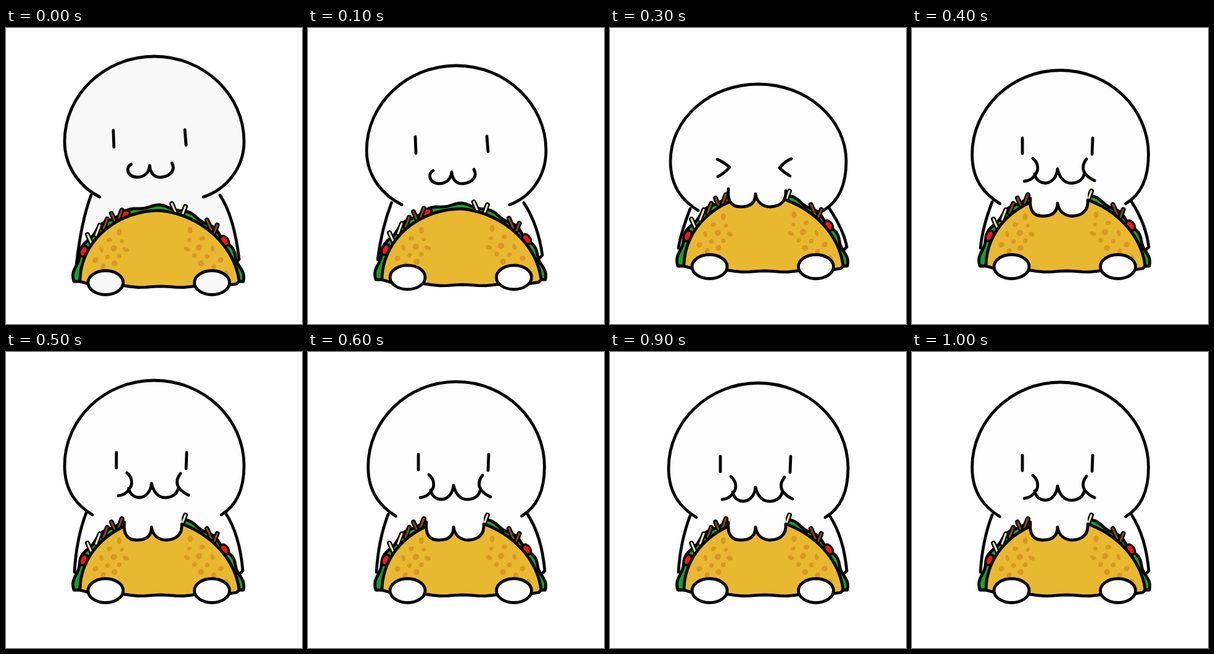
These frames come from a looping animation (480 by 480 pixels, 1.1 s). An HTML page with a canvas:

```html
<!DOCTYPE html>
<html>
<head>
<meta charset="utf-8">
<style>
html, body { margin: 0; width: 100%; height: 100%; overflow: hidden; background: #fff; }
canvas { display: block; width: 480px; height: 480px; }
</style>
</head>
<body>
<canvas id="stage" width="480" height="480"></canvas>
<script>
const ctx = document.getElementById('stage').getContext('2d');
const STEP = 100, STEPS = 11, BITE = 3, CHEW = 5;
const BROWN = '#8a4b12', CREAM = '#f6eab4', RED = '#f3151c', GREEN = '#18a030';
const { PI, sin, cos, min, max } = Math;

const SMILE = 'M203 221C195 224 194 240 212 242C225 242 232 234 233 223C234 236 241 243 252 242C268 240 275 229 269 219';
const JAW = 'M208 241Q207 248 211 256M266 240Q268 246 269 252';
const CHEWING = 'M196 196C205 203 206 215 200 222Q194 232 182 233M199 221C201 231 208 236 217 236C228 235 235 225 236 213' +
  'C239 227 247 237 260 236C270 235 277 230 279 222M283 197C276 206 276 214 281 221Q287 228 296 232';
const SQUINT = 'M174 213Q184 217 194 226Q186 235 175 241M294 212Q282 217 275 227Q283 235 292 240';
const BITTEN = 'M192 276C190 296 197 305 212 305C228 305 236 298 236 284C238 298 248 305 260 305C277 304 286 296 285 279';

function ink(path, width = 4.8, color = '#000') {
  ctx.lineWidth = width;
  ctx.strokeStyle = color;
  ctx.stroke(new Path2D(path));
}

function paint(path, color, width) {
  ctx.fillStyle = color;
  ctx.fill(new Path2D(path));
  if (width) ink(path, width);
}

function oval(x, y, rx, ry, turn = 0) {
  const path = new Path2D();
  path.ellipse(x, y, rx, ry, turn, 0, PI * 2);
  return path;
}

function shifted(dy, draw) {
  ctx.save();
  ctx.translate(0, dy);
  draw();
  ctx.restore();
}

// A point on the taco: r = 1 is the shell's edge, which is flatter on the right.
function onTaco(angle, r) {
  const size = r - 0.05 * max(0, sin(2 * angle));
  return [249 + 129 * size * cos(angle), 411 - 115 * size * sin(angle)];
}

function dome(radius) {
  const points = [];
  for (let i = 0; i <= 80; i++) {
    const angle = PI * (1 - i / 80);
    points.push(onTaco(angle, radius(angle)));
  }
  return points;
}

const polygon = points => `M${points.join('L')}Z`;

const shellRim = dome(() => 1);
for (let u = 0; u <= 1; u += 0.05) {
  shellRim.push([374 - 246 * u, 415 + 5 * sin(PI * u) + 1.2 * sin(22 * u)]);
}
const shell = polygon(shellRim);
const lettuce = polygon(dome(a => 1.065 - 0.012 * cos(a) + 0.017 * sin(17 * a)));

const degrees = d => d * PI / 180;
const tomatoes = [35, 115, 156].map(degrees);
const sticks = [[BROWN, [46, 52, 118, 123, 130]], [CREAM, [73, 80, 137, 146]]];

function drawSticks(color, angles) {
  angles.forEach((angle, i) => {
    const [x, y] = onTaco(degrees(angle), 1.06);
    const lean = i % 2 ? 3.5 : -3;
    const path = `M${x - lean} ${y - 8}L${x + lean} ${y + 8}`;
    ink(path, 8);
    ink(path, 3, color);
  });
}

// Toasted spots zigzag along a band inside the shell.
function drawSpots(from, to, count) {
  for (let i = 0; i < count; i++) {
    const angle = degrees(from + (to - from) * i / (count - 1));
    const [x, y] = onTaco(angle, 0.86 - 0.12 * (i % 3));
    paint(oval(x, y, 4 + sin(i * 5), 4.5 + cos(i * 3), i), '#d99724');
  }
}

function drawTaco() {
  paint(lettuce, GREEN, 4.8);
  for (const angle of tomatoes) {
    paint(oval(...onTaco(angle, 1.045), 9, 6, PI / 2 - angle), RED, 3.5);
  }
  for (const [color, angles] of sticks) drawSticks(color, angles);
  paint(shell, '#e8b930', 4.8);
  drawSpots(126, 167, 12);
  drawSpots(62, 8, 13);
}

function drawBody(chin, rise, fill) {
  const y = chin - 3, x1 = 138 - 8 * rise, x2 = 347 + 9 * rise;
  const endX = 378 + 6 * rise, endY = 375 - 20 * rise;
  const left = `M${x1} ${y}Q${x1 - 16} ${y + 42} ${114 - 3 * rise} ${385 - 28 * rise}`;
  const right = `M${x2} ${y}Q${x2 + 23} ${y + 35} ${endX} ${endY}L${endX - 9} ${endY + 9}`;
  paint(`${left}L${endX} ${endY}L${x2} ${y}Z`, fill);
  paint(right, fill);
  ink(left);
  ink(right);
}

function drawHead(top, side, half, chin, gapLeft, gapRight, fill) {
  const mid = 240.5, l = mid - half, r = mid + half;
  const lift = side - (side - top) * 0.55, reach = half * 0.55;
  const x1 = l + gapLeft, x2 = r - gapRight;
  const path = `M${x1} ${chin}C${l + gapLeft * 0.5} ${chin - 14} ${l} ${side + 44} ${l} ${side}` +
    `C${l} ${lift} ${mid - reach} ${top} ${mid} ${top}C${mid + reach} ${top} ${r} ${lift} ${r} ${side}` +
    `C${r} ${side + 44} ${r - gapRight * 0.45} ${chin - 12} ${x2} ${chin}`;
  paint(path, fill);
  ink(path);
}

function drawFace(n, shift) {
  if (n === BITE) return ink(SQUINT);
  const eating = n > BITE;
  shifted(shift, () => {
    ink(eating ? 'M179 163v25M293 163l-1 26' : 'M174 166l1 27M290 165l2 25');
    ink(eating ? CHEWING : SMILE);
    if (n === BITE - 1) ink(JAW);
  });
}

function drawPose(n) {
  const eating = n >= BITE;
  const rise = min(n / BITE, 1);
  const drop = max(0, min(rise, (CHEW - n) / (CHEW - BITE)));
  const bob = n > CHEW ? 6.5 * sin(PI * (n - CHEW) / 6.5) : 0;
  const puff = n > BITE ? (n % 2 ? 0 : -2.5) : -3 * drop ** 4;
  const top = 46 + 45 * drop + 0.7 * bob;
  const side = top + 138 - 13 * drop ** 3;
  const chin = side + (eating ? 80 : 90 - 2 * n);
  const fill = n ? '#fdfdfd' : '#f8f8f8';

  ctx.fillStyle = '#fff';
  ctx.fillRect(0, 0, 480, 480);
  ctx.lineCap = ctx.lineJoin = 'round';
  drawBody(chin, rise, fill);
  drawHead(top, side, 145.5 + puff, chin, eating ? 45 : 57, eating ? 37 : 66 - 7 * n, fill);
  shifted(-25 * rise ** 2, drawTaco);
  if (eating) {
    shifted(n === BITE ? -15 : 0, () => {
      paint(BITTEN + 'V252H192Z', fill);
      ink(BITTEN);
    });
  }
  for (const x of [161.5, 334]) paint(oval(x, 413 - 26 * rise, 28.5, 19.5), fill, 4.8);
  drawFace(n, 31 * drop + bob);
}

const start = performance.now();
function tick() {
  const time = performance.now() - start;
  drawPose(Math.floor(time / STEP) % STEPS);
  requestAnimationFrame(tick);
}
tick();
</script>
</body>
</html>
```
